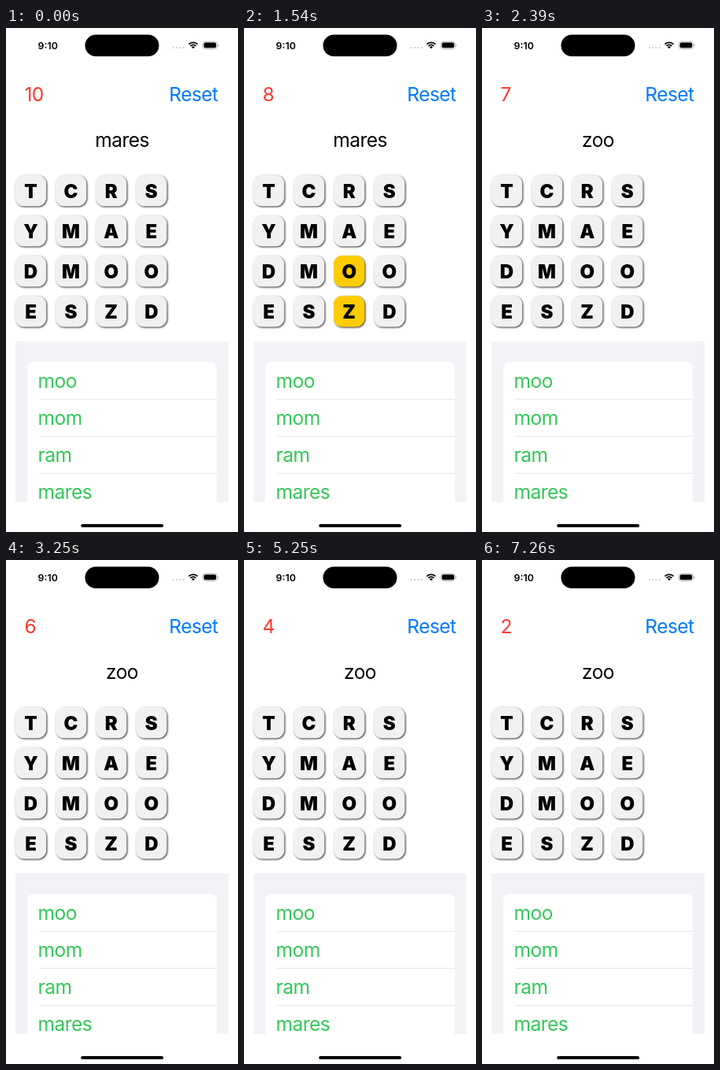
Recreate the animation shown at these times as an HTML page. Size 295 px wide and 640 px high, loop 8 s.

```html
<!DOCTYPE html>
<html lang="en">
<head>
<meta charset="utf-8">
<title>Word tiles</title>
<style>
  html, body { margin: 0; width: 100%; height: 100%; overflow: hidden; background: #fff; }
  svg { display: block; width: 100%; height: 100%; }
  text {
    font-family: Inter, "Liberation Sans", sans-serif;
    font-size: 24.6px;
    letter-spacing: -0.024em;
    font-optical-sizing: none;
  }
  .mid { text-anchor: middle; }
  .clock { font-size: 12.4px; font-weight: 600; letter-spacing: 0; }
  .letter { font-size: 24px; font-weight: 900; letter-spacing: 0; }
  .tile { filter: drop-shadow(1.5px 1.5px 1px rgba(0, 0, 0, .8)); }
</style>
</head>
<body>
<svg id="stage" viewBox="0 0 295 640"></svg>
<script>
const LOOP = 8000;
const TICKS = [220, 1230, 2240, 3250, 4250, 5250, 6260, 7260];
const PICKS = [{ tile: 14, at: 1110 }, { tile: 10, at: 1540 }, { tile: 11, at: 2040 }];
const SUBMIT = 2390;
const LETTERS = "TCRSYMAEDMOOESZD";
const WORDS = ["moo", "mom", "ram", "mares"];
const PLAIN = "#f1f1f3", PICKED = "#ffcc00";

const stage = document.getElementById("stage");

function add(tag, attrs, content) {
  const el = document.createElementNS(stage.namespaceURI, tag);
  for (const key in attrs) el.setAttribute(key, attrs[key]);
  if (content) el.textContent = content;
  stage.appendChild(el);
  return el;
}

function rect(x, y, width, height, fill, rx = 0, more = {}) {
  return add("rect", { x, y, width, height, fill, rx, ...more });
}

function label(x, y, content, fill, cls = "") {
  return add("text", { x, y, fill, class: cls }, content);
}

function drawStatusBar() {
  label(40.6, 26.5, "9:10", "#000", "clock");
  rect(100.5, 8.5, 94, 27.6, "#000", 13.8);
  for (let i = 0; i < 4; i++) {
    add("circle", { cx: 212.8 + i * 4.3, cy: 25, r: 1.1, fill: "#c6c6c8" });
  }
  // Wi-Fi fan: a filled wedge and two arcs around one centre
  const cx = 238, cy = 26.3, s = Math.SQRT1_2;
  const arc = r => `M${cx - r * s} ${cy - r * s}A${r} ${r} 0 0 1 ${cx + r * s} ${cy - r * s}`;
  add("path", { d: arc(2.9) + `L${cx} ${cy}Z`, fill: "#000" });
  for (const r of [4.9, 7.9]) {
    add("path", { d: arc(r), fill: "none", stroke: "#000", "stroke-width": 1.7 });
  }
  rect(250.3, 17.3, 18.2, 9.2, "none", 3, { stroke: "#a4a4a4", "stroke-width": 0.8 });
  rect(251.6, 18.6, 15.6, 6.6, "#000", 1.9);
  rect(269.4, 20.4, 1, 3, "#a4a4a4", 0.5);
}

function drawTiles() {
  return [...LETTERS].map((letter, i) => {
    const x = 11.8 + (i % 4) * 51.1;
    const y = 186.8 + Math.floor(i / 4) * 51.1;
    const tile = rect(x, y, 39.4, 39.4, PLAIN, 11, { class: "tile" });
    label(x + 19.7, y + 28.9, letter, "#000", "letter mid");
    return tile;
  });
}

function drawList() {
  rect(12, 398, 271, 204, "#f2f2f7");
  add("path", { d: "M27 602V431.5a7.5 7.5 0 0 1 7.5-7.5H260.5a7.5 7.5 0 0 1 7.5 7.5V602Z", fill: "#fff" });
  WORDS.forEach((word, i) => {
    const y = 424 + i * 47;
    if (i) rect(42, y, 226, 0.7, "#dcdcdf");
    label(40.6, y + 33.4, word, "#34c759");
  });
}

drawStatusBar();
const counter = label(23.4, 93, "10", "#ff3b30");
label(207.3, 93, "Reset", "#007aff");
const word = label(147.5, 151, "mares", "#000", "mid");
const tiles = drawTiles();
drawList();
rect(95.2, 630, 105, 4, "#000", 2);

function setText(el, content) {
  if (el.textContent !== content) el.textContent = content;
}

function render(t) {
  setText(counter, String(10 - TICKS.filter(at => t >= at).length));
  setText(word, t < SUBMIT ? "mares" : "zoo");
  for (const { tile, at } of PICKS) {
    tiles[tile].setAttribute("fill", t >= at && t < SUBMIT ? PICKED : PLAIN);
  }
}

const start = performance.now();
function frame() {
  render((performance.now() - start) % LOOP);
  requestAnimationFrame(frame);
}
frame();
</script>
</body>
</html>
```
